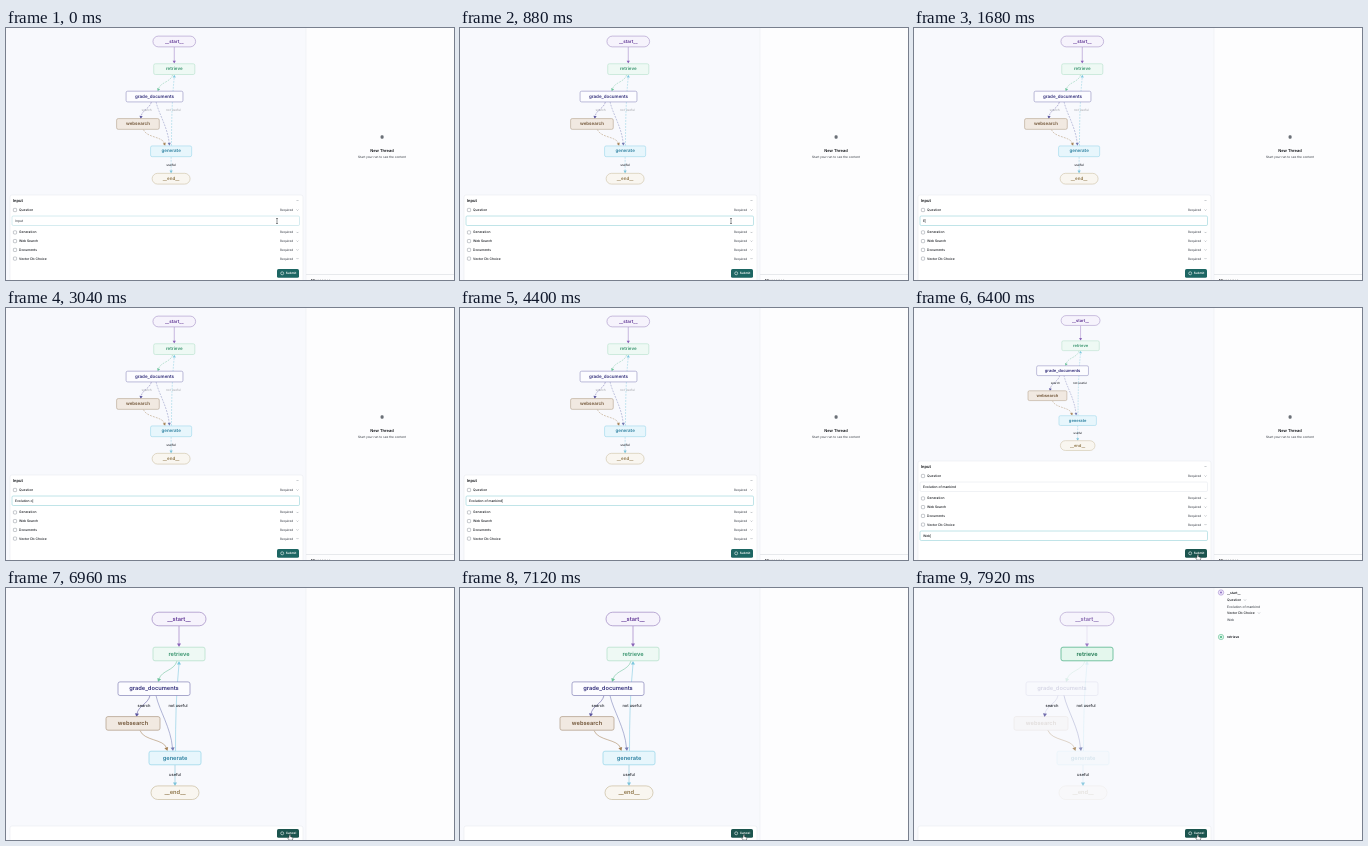
These frames come from a looping animation (448x252 px, 8000 ms). An HTML page:

```html
<!DOCTYPE html>
<html lang="en">
<head>
<meta charset="utf-8">
<title>Graph run</title>
<style>
  html, body { margin: 0; width: 100%; height: 100%; overflow: hidden; background: #f8f9fc; }
  svg { display: block; width: 100vw; height: 100vh; }
  text { font: 500 3.3px Inter, "Open Sans", sans-serif; fill: #181b20; dominant-baseline: central; white-space: pre; text-rendering: geometricPrecision; }
  .mid { text-anchor: middle; }
  .head { font-size: 4px; font-weight: 600; fill: #0c0e12; }
  .dim { fill: #4c5159; }
  .small { font-size: 3.1px; }
  .node { font-size: 5.7px; font-weight: 600; }
  .label { font-size: 4px; fill: #23272f; }
  .line { fill: none; stroke: #80868f; stroke-width: .45; }
  .box { fill: #fff; stroke-width: .55; }
</style>
</head>
<body>
<svg id="stage" viewBox="0 0 448 252" preserveAspectRatio="none"></svg>
<script>
const LOOP = 8000;
const stage = document.getElementById('stage');

function add(parent, tag, attrs = {}, content) {
  const el = document.createElementNS('http://www.w3.org/2000/svg', tag);
  set(el, attrs);
  if (content !== undefined) el.textContent = content;
  parent.appendChild(el);
  return el;
}
function set(el, attrs) {
  for (const k in attrs) el.setAttribute(k, attrs[k]);
}
const group = parent => add(parent, 'g');
const label = (p, x, y, s, cls = '') => add(p, 'text', { x, y, class: cls }, s);
const show = (el, on) => { el.style.display = on ? '' : 'none'; };
const clamp = v => Math.max(0, Math.min(1, v));
const ease = (t, a, b) => { const u = clamp((t - a) / (b - a)); return u * u * (3 - 2 * u); };
const mix = (a, b, u) => a + (b - a) * u;
const chevron = (p, x, y) => add(p, 'path', { d: `M${x - 1} ${y - .5}l1 1l1-1`, class: 'line' });

// Graph
add(stage, 'rect', { width: 448, height: 252, fill: '#f8f9fd' });
const graph = group(stage);
const NODES = {
  start: ['__start__', 173, 31, 54, '#a48fc6', '#f6f3fc', '#5f3494'],
  retrieve: ['retrieve', 173, 66, 52, '#b4e0ca', '#eef9f4', '#36936c'],
  grade: ['grade_documents', 148, 100.7, 72, '#8e8cbd', '#fcfcff', '#2f2b78'],
  web: ['websearch', 127, 135.4, 54, '#b3a08b', '#f1e9e1', '#6f5335'],
  generate: ['generate', 169, 170, 52, '#9ad7ea', '#e7f6fc', '#2b7f9f'],
  end: ['__end__', 169, 204.7, 48, '#cdc0a4', '#f9f6f0', '#8d7447']
};
const EDGES = [
  ['M173 38V56', 173, 59, 0, '#8a63b8'],
  ['M171 73C168 83 156 82 153 91', 152, 94, 20, '#6cc39b'],
  ['M144 107.5C142 116 132 118 131 126', 130.5, 129, 8, '#5c569f'],
  ['M150 107.5C153 122 165 140 166.5 160', 167, 163, -6, '#757cb4'],
  ['M169.5 163C169.5 135 170 105 173 76', 173, 73, 180, '#7cc8de'],
  ['M134 142.5C138 153 158 151 160.5 160', 161.5, 163, -20, '#a58256'],
  ['M169 177V195', 169, 198, 0, '#7cc3da']
];
const edges = EDGES.map(([d, x, y, turn, color]) => {
  const g = group(graph);
  const path = add(g, 'path', { d, fill: 'none', stroke: color, 'stroke-width': .7 });
  const head = add(g, 'path', { d: 'M0 0L-2-3.6H2Z', fill: color, transform: `translate(${x} ${y}) rotate(${turn})` });
  return { path, head };
});
const nodes = {};
for (const id in NODES) {
  const [name, x, y, w, stroke, fill, ink] = NODES[id];
  const g = group(graph);
  const pill = id === 'start' || id === 'end';
  const box = add(g, 'rect', { x: x - w / 2, y: y - 6.8, width: w, height: 13.6, rx: pill ? 6.8 : 2, fill, stroke, 'stroke-width': .75 });
  const text = label(g, x, y, name, 'mid node');
  text.style.fill = ink;
  nodes[id] = { g, box, text };
}
const tags = [['search', 138, 117.5], ['not useful', 172, 117.5], ['useful', 169, 186.7]]
  .map(([s, x, y]) => label(graph, x, y, s, 'mid label'));

// Right panel
add(stage, 'rect', { x: 300, width: 148, height: 252, fill: '#fdfdfe' });
add(stage, 'path', { d: 'M300 0V252', stroke: '#eceef3', 'stroke-width': .6 });
const idle = group(stage);
add(idle, 'rect', { x: 374.6, y: 107.2, width: 3, height: 3.6, rx: 1.2, fill: '#6b7077' });
label(idle, 376, 122.3, 'New Thread', 'mid head');
label(idle, 376, 128.6, 'Start your run to see the content', 'mid dim small');
add(idle, 'path', { d: 'M300 246.5H448', stroke: '#dfe1e5', 'stroke-width': .7 });
label(idle, 305, 252.4, 'Messages', 'head');

const stepOne = group(stage);
function step(p, y, name, color, tint) {
  add(p, 'circle', { cx: 307, cy: y, r: 2.7, fill: tint, stroke: color, 'stroke-width': .45 });
  add(p, 'circle', { cx: 307, cy: y, r: 1, fill: color });
  label(p, 313, y, name).style.fontWeight = 600;
}
step(stepOne, 4.5, '__start__', '#8b6fc0', '#efe7fb');
label(stepOne, 313, 12, 'Question');
chevron(stepOne, 331, 12);
label(stepOne, 313, 18.5, 'Evolution of mankind', 'dim');
label(stepOne, 313, 25, 'Vector Db Choice');
chevron(stepOne, 345, 25);
label(stepOne, 313, 31.5, 'Web', 'dim');
const stepTwo = group(stage);
step(stepTwo, 49, 'retrieve', '#3faf7c', '#dcf5e8');

// Input card
const card = add(stage, 'rect', { x: 4, width: 293, height: 110, rx: 2, fill: '#fff', stroke: '#e9ebf0', 'stroke-width': .6 });
const form = group(stage);
label(form, 7, 172.5, 'Input', 'head');
chevron(form, 291.5, 172.5);
['Question', 'Generation', 'Web Search', 'Documents', 'Vector Db Choice'].forEach((name, i) => {
  const y = [182, 204.4, 213.1, 221.9, 230.6][i];
  add(form, 'rect', { x: 7.4, y: y - 1.6, width: 3.2, height: 3.2, rx: .7, class: 'line' });
  label(form, 13, y, name);
  label(form, 274, y, 'Required', 'dim small');
  chevron(form, 291.5, y);
});
function field(y) {
  const g = group(form);
  const box = add(g, 'rect', { x: 6, y, width: 287.5, height: 9.5, rx: 1.2, class: 'box' });
  const text = label(g, 9, y + 5.1, '');
  const caret = add(g, 'path', { stroke: '#22262c', 'stroke-width': .35 });
  return { box, text, caret, y, g };
}
const question = field(188);
const choice = field(237);

function fill(f, value, focus, blink, rest) {
  f.text.textContent = value || (focus ? '' : 'Input');
  f.text.setAttribute('class', value ? '' : 'dim');
  f.box.setAttribute('stroke', focus ? '#8bcdd5' : rest);
  show(f.caret, focus && blink);
  if (focus) {
    const x = 9.3 + (value ? f.text.getComputedTextLength() : 0);
    f.caret.setAttribute('d', `M${x} ${f.y + 3}v4`);
  }
}

// Button
const button = add(stage, 'rect', { x: 271, y: 241, width: 22, height: 8.8, rx: 1.6 });
add(stage, 'circle', { cx: 276.2, cy: 245.3, r: 1.5, fill: 'none', stroke: '#eef7f5', 'stroke-width': .6 });
const action = label(stage, 279.8, 245.4, 'Submit', 'small');
action.style.fill = '#fff';
action.style.fontWeight = 600;

// Pointers
const beam = add(stage, 'path', { d: 'M-1-2.5h2M0-2.5v5M-1 2.5h2', fill: 'none', stroke: '#25282d', 'stroke-width': .5 });
const hand = add(stage, 'path', {
  d: 'M-.6-2.2q.6-.7 1.2 0v2l1.6.4q.8.3.6 1.2l-.5 1.8h-3l-1.5-2q.2-.9 1 -.4z',
  fill: '#fff', stroke: '#16191c', 'stroke-width': .45
});

const typed = (word, t, from, to) =>
  word.slice(0, t < from ? 0 : 1 + Math.floor(clamp((t - from) / (to - from)) * (word.length - 1)));

// Scale and offset of the graph for each layout
const FITS = [[.79, 31.6, -11], [.72, 42, -9.8], [1, 0, 0]];
function fit(t) {
  const a = ease(t, 4880, 5040), b = ease(t, 6720, 6960);
  return FITS[0].map((v, i) => mix(mix(v, FITS[1][i], a), FITS[2][i], b));
}

function pointer(t) {
  let x = 271, y = 193;
  const go = (a, b, nx, ny) => { const u = ease(t, a, b); x = mix(x, nx, u); y = mix(y, ny, u); };
  go(4500, 4780, 291, 231);
  go(5000, 5280, 270, 228);
  go(6080, 6340, 284, 249);
  const typing = (t > 1520 && t < 4500) || (t > 5640 && t < 6080);
  const overText = t < 4600 || (t > 5120 && t < 6200);
  show(beam, !typing && overText);
  show(hand, !typing && !overText);
  const place = `translate(${x} ${y})`;
  beam.setAttribute('transform', place);
  hand.setAttribute('transform', place);
}

function render(t) {
  const open = t >= 4880, sent = t >= 6720;
  const [s, x, y] = fit(t);
  graph.setAttribute('transform', `translate(${x} ${y}) scale(${s})`);

  const run = ease(t, 7280, 7520), active = t >= 7520;
  for (const id of ['grade', 'web', 'generate', 'end']) nodes[id].g.style.opacity = mix(1, .16, run);
  nodes.start.g.style.opacity = mix(1, .75, run);
  edges.forEach(({ path, head }, i) => {
    path.style.strokeDasharray = sent || i === 0 ? 'none' : '2.4 1.4';
    path.style.opacity = mix(.8, i === 3 || i === 5 ? .45 : .2, run);
    head.style.opacity = mix(1, i === 1 || i === 4 ? .2 : .85, run);
  });
  tags.forEach((tag, i) => { tag.style.opacity = !open && i < 2 ? .35 : 1; });
  const [, , , , stroke, tint, ink] = NODES.retrieve;
  set(nodes.retrieve.box, { stroke: active ? '#4fb287' : stroke, fill: active ? '#e4f7ed' : tint });
  nodes.retrieve.text.style.fill = active ? '#1f7a52' : ink;

  show(idle, !sent);
  show(stepOne, t >= 7440);
  show(stepTwo, t >= 7680);

  card.setAttribute('y', sent ? 238 : open ? 153 : 167);
  show(form, !sent);
  form.setAttribute('transform', `translate(0 ${open ? -14 : 0})`);
  const blink = t % 1000 < 560;
  fill(question, typed('Evolution of mankind', t, 1600, 4240), t >= 400 && t < 4800, blink || t > 1600, open ? '#e4e7ec' : '#b5dce3');
  show(choice.g, open);
  fill(choice, typed('Web', t, 5760, 6080), t >= 5440, blink, '#d3e2e6');

  button.setAttribute('fill', t >= 6320 ? '#1b544e' : '#1d6663');
  action.textContent = sent ? 'Cancel' : 'Submit';
  pointer(t);
}

let origin;
function tick(now) {
  if (origin === undefined) origin = now;
  render((now - origin) % LOOP);
  requestAnimationFrame(tick);
}
render(0);
requestAnimationFrame(tick);
</script>
</body>
</html>
```
